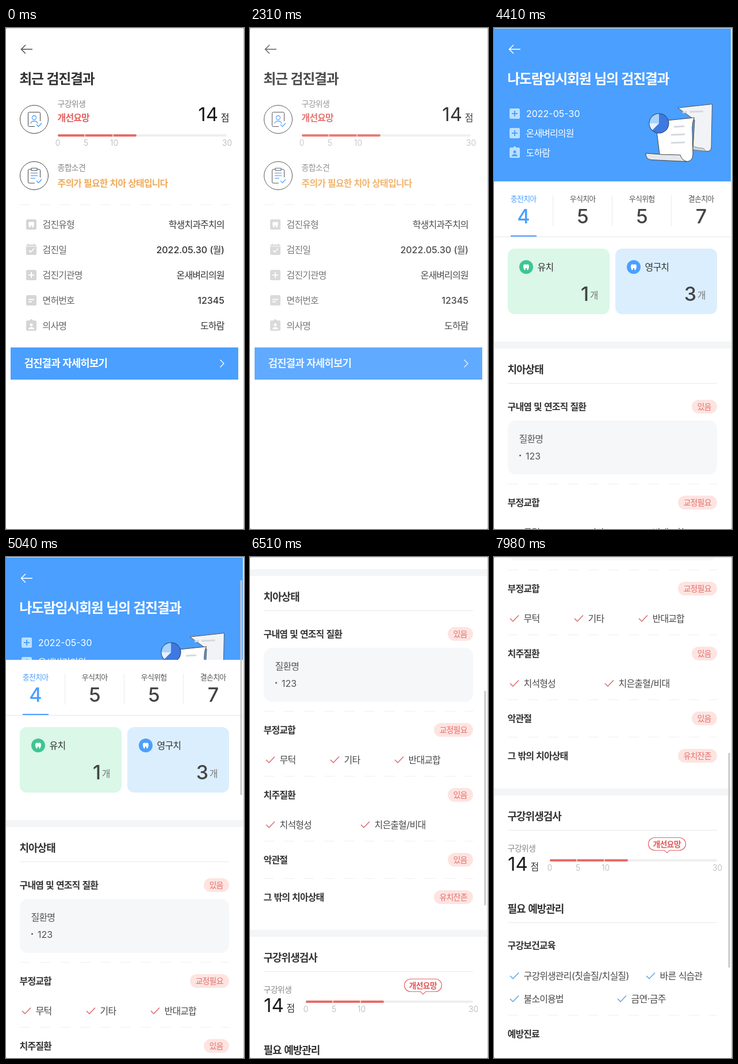
An HTML page with a canvas that plays this animation: 414x872 px, repeating every 8000 ms.

```html
<!DOCTYPE html>
<html lang="ko">
<head>
<meta charset="utf-8">
<title>검진결과</title>
<style>
html, body { margin: 0; width: 100%; height: 100%; overflow: hidden; background: #fff; }
canvas { display: block; width: 414px; height: 872px; }
</style>
</head>
<body>
<canvas id="stage"></canvas>
<script>
const W = 414, H = 872, LOOP = 8000, STEP = 70;
const BLUE = '#4a9fff', RED = '#e96b66', INK = '#333', GRAY = '#888';
const DOCTOR = '도하람', CLINIC = '온새벼리의원', PATIENT = '나도람임시회원';

const canvas = document.getElementById('stage');
const dpr = window.devicePixelRatio || 1;
canvas.width = W * dpr;
canvas.height = H * dpr;
const c = canvas.getContext('2d');

const clamp = v => Math.max(0, Math.min(1, v));
const ramp = (t, from, to) => clamp((t - from) / (to - from));

// ---- drawing helpers ----

// Hangul is set slightly tighter than Latin text and digits.
function text(str, x, cy, size, color, weight = 400, align = 'left') {
  c.font = `${weight} ${size}px Inter, "Noto Sans CJK KR", "Noto Sans CJK", sans-serif`;
  c.fillStyle = color;
  const tight = -0.056 * size;
  const runs = str.match(/[가-힣]+|[^가-힣]+/g).map(s => {
    const hangul = /[가-힣]/.test(s);
    c.letterSpacing = '0px';
    const w = c.measureText(s).width + (hangul ? tight * s.length : 0);
    return { s, hangul, w };
  });
  const total = runs.reduce((sum, r) => sum + r.w, 0);
  if (align === 'right') x -= total;
  if (align === 'center') x -= total / 2;
  for (const r of runs) {
    c.letterSpacing = r.hangul ? tight + 'px' : '0px';
    c.fillText(r.s, x + (r.hangul ? tight / 2 : 0), cy + size * 0.37);
    x += r.w;
  }
  c.letterSpacing = '0px';
}

function rect(x, y, w, h, color) {
  c.fillStyle = color;
  c.fillRect(x, y, w, h);
}

function round(x, y, w, h, r, color) {
  c.fillStyle = color;
  c.beginPath();
  c.roundRect(x, y, w, h, r);
  c.fill();
}

function disc(x, y, r, color) {
  c.fillStyle = color;
  c.beginPath();
  c.arc(x, y, r, 0, Math.PI * 2);
  c.fill();
}

function line(points, color, width = 1) {
  c.strokeStyle = color;
  c.lineWidth = width;
  c.beginPath();
  points.forEach(([x, y], i) => i ? c.lineTo(x, y) : c.moveTo(x, y));
  c.stroke();
}

function shape(d, fill, stroke, width = 1) {
  const p = new Path2D(d);
  if (fill) { c.fillStyle = fill; c.fill(p); }
  if (stroke) { c.strokeStyle = stroke; c.lineWidth = width; c.stroke(p); }
}

function at(x, y, draw) {
  c.save();
  c.translate(x, y);
  draw();
  c.restore();
}

function fade(alpha, draw) {
  if (alpha <= 0) return;
  c.save();
  c.globalAlpha *= alpha;
  draw();
  c.restore();
}

function dashes(y) {
  c.save();
  c.setLineDash([18, 17]);
  line([[24, y + .5], [388, y + .5]], '#eeeeee');
  c.restore();
}

function rule(y) { rect(24, y, 364, 1, '#e9e9e9'); }

function tick(x, y, color) {
  line([[x, y], [x + 5, y + 5], [x + 15, y - 5.5]], color, 1.5);
}

// ---- icons ----

function backArrow(color) {
  line([[46, 37], [27, 37]], color, 1.6);
  line([[34, 29.5], [26.5, 37], [34, 44.5]], color, 1.6);
}

function tooth(color) {
  shape('M0 -4C-2 -5.6 -5 -5 -5 -1.8C-5 1 -3.8 5.5 -2.4 5.5C-1 5.5 -1.4 1.6 0 1.6C1.4 1.6 1 5.5 2.4 5.5C3.8 5.5 5 1 5 -1.8C5 -5 2 -5.6 0 -4Z', color);
}

const glyphs = {
  tooth,
  date(color) { line([[-4, 1], [-1, 4], [5, -2.5]], color, 1.8); },
  plus(color) {
    rect(-5, -1, 10, 2, color);
    rect(-1, -5, 2, 10, color);
  },
  card(color) {
    rect(-5, -2.5, 10, 2, color);
    rect(-5, 1.5, 6, 2, color);
  },
  person(color) {
    disc(0, -1.5, 2.5, color);
    shape('M-5 6.2C-5 1.4 5 1.4 5 6.2Z', color);
  }
};

function boxIcon(kind, x, y, back, front) {
  at(x, y, () => {
    round(-9, -9, 18, 18, 2.5, back);
    if (kind === 'date') {
      rect(-6, -10.5, 2, 3, back);
      rect(4, -10.5, 2, 3, back);
      rect(-9, -6.5, 18, 1, front);
    }
    if (kind === 'person') disc(0, -9, 2.2, back);
    glyphs[kind](front);
  });
}

function ringIcon(y, draw) {
  at(49, y, () => {
    c.strokeStyle = '#444';
    c.lineWidth = 1;
    c.beginPath();
    c.arc(0, 0, 24.5, 0, Math.PI * 2);
    c.stroke();
    draw();
    line([[4, 9], [7.5, 12.5], [13, 6.5]], BLUE, 1.4);
  });
}

function profileIcon() {
  shape('M1 12.5H-8.5Q-10.5 12.5 -10.5 10.5V-10.5Q-10.5 -12.5 -8.5 -12.5H8.5Q10.5 -12.5 10.5 -10.5V3', null, '#444');
  shape('M3.5 -3A3.5 3.5 0 1 1 -3.5 -3A3.5 3.5 0 1 1 3.5 -3M-6 7.5C-6 1.5 6 1.5 6 7.5', null, BLUE, 1.3);
}

function clipIcon() {
  shape('M1 13H-8.5Q-10.5 13 -10.5 11V-9Q-10.5 -11 -8.5 -11H-5M5 -11H8.5Q10.5 -11 10.5 -9V3', null, '#444');
  shape('M-5 -13H5V-9H-5Z', null, '#444');
  for (const [y, w] of [[-4.5, 12], [0, 12], [4.5, 8]])
    line([[-6, y], [-6 + w, y]], BLUE, 1.3);
}

// ---- shared widgets ----

function scale(x, y, end, redEnd, marks) {
  round(x, y - 2, end - x, 4, 2, '#eeeeee');
  round(x, y - 2, redEnd - x, 4, 2, RED);
  for (const m of marks) rect(m - 1.5, y - 2, 1.2, 4, '#fff');
  text('0', x, y + 13, 14, '#b0b0b0', 300, 'center');
  text('5', marks[0] + 1, y + 13, 14, '#b0b0b0', 300, 'center');
  text('10', marks[1] + 1, y + 13, 14, '#b0b0b0', 300, 'center');
  text('30', end + .5, y + 13, 14, '#b0b0b0', 300, 'center');
}

function badge(label, cy) {
  const w = label.length * 12 + 20;
  round(388 - w, cy - 12, w, 24, 12, '#fde4e1');
  text(label, 388 - w / 2, cy, 14, '#e4706c', 500, 'center');
}

function topic(label, cy, tag) {
  text(label, 24, cy, 16, INK, 600);
  if (tag) badge(tag, cy);
}

function section(label, cy) {
  text(label, 24, cy, 18, INK, 600);
  rule(cy + 24);
}

function checks(cy, color, items) {
  for (const [x, label] of items) {
    tick(x, cy, color);
    text(label, x + 24, cy, 16, '#484848');
  }
}

// ---- first page ----

function summary() {
  backArrow('#555');
  text('최근 검진결과', 24, 88, 24, INK, 700);

  ringIcon(159, profileIcon);
  text('구강위생', 90, 132, 14, GRAY);
  text('개선요망', 90, 156, 16, '#e5625f', 700);
  text('14', 369, 150, 33, '#1a1a1a', 400, 'right');
  text('점', 388, 156, 16, '#222', 500, 'right');
  scale(90, 187, 384, 227, [138, 187]);

  ringIcon(257, clipIcon);
  text('종합소견', 90, 243, 14, GRAY);
  text('주의가 필요한 치아 상태입니다', 90, 270, 16, '#f0ab5a', 600);
  dashes(307);

  const rows = [
    ['tooth', '검진유형', '학생치과주치의'],
    ['date', '검진일', '2022.05.30 (월)'],
    ['plus', '검진기관명', CLINIC],
    ['card', '면허번호', '12345'],
    ['person', '의사명', DOCTOR]
  ];
  rows.forEach(([icon, label, value], i) => {
    const y = 342 + i * 44;
    boxIcon(icon, 44, y, '#d5d5d5', '#fff');
    text(label, 64, y, 16, '#666');
    text(value, 380, y, 16, INK, 500, 'right');
  });

  rect(8, 556, 396, 56, BLUE);
  text('검진결과 자세히보기', 32, 583, 18, '#fff', 600);
  line([[372.5, 577.5], [379, 584], [372.5, 590.5]], '#fff', 1.4);
}

// ---- second page ----

function papers() {
  shape('M320 139L379.5 132.5L378 208Q377 215 370 214.5L346 212L349 160Z', '#f1f3f6', '#555');
  shape('M358 209Q366 208 368 214.5L346 212V206Z', '#cfd5de', '#666', .7);
  shape('M281 163L348.5 156Q344 165 345 180L346 219Q346 232 335 232.5L292 227L288 220Z', '#fff', '#444');
  shape('M264 218Q294 221 324 221Q327 231 336 232.5L274 229.5Q264 229 264 218Z', '#e4e8ee', '#444');
  const bars = [[328, 147, 8], [340, 146, 24], [313, 172, 18], [308, 186, 24], [308, 200, 24]];
  for (const [x, y, w] of bars) line([[x, y], [x + w, y - 1]], '#d5d9e0', 3);
  disc(287, 166, 17.5, '#24456f');
  disc(287, 166, 16.5, '#3f78e0');
  shape('M287 166L270.5 166A16.5 16.5 0 0 1 287 149.5Z', '#a9d4fb');
  shape('M287 166L270.5 166A16.5 16.5 0 0 0 275.5 177.7Z', '#e6f2fd');
}

function header() {
  rect(0, 0, 412, 268, BLUE);
  backArrow('#fff');
  text(PATIENT + ' 님의 검진결과', 24, 88, 24, '#fff', 700);
  [['plus', '2022-05-30'], ['plus', CLINIC], ['person', DOCTOR]].forEach(([icon, label], i) => {
    const y = 149 + i * 34;
    boxIcon(icon, 36, y, '#b9e0ff', BLUE);
    text(label, 56, y, 16, '#fff');
  });
  papers();
}

function tabs() {
  [['충전치아', 4], ['우식치아', 5], ['우식위험', 5], ['결손치아', 7]].forEach(([label, n], i) => {
    const x = 51.5 + i * 103;
    text(label, x, 297, 13, i ? '#555' : BLUE, 500, 'center');
    text(String(n), x, 327, 34, i ? '#444' : BLUE, 500, 'center');
    if (i) rect(x - 52.5, 291, 1, 54, '#ebebeb');
  });
  rect(0, 363, 412, 1, '#e6e6e6');
  rect(29, 361, 45, 2, BLUE);
}

function countCard(x, back, color, label, n) {
  round(x, 384, 177, 114, 12, back);
  disc(x + 32, 416, 12, color);
  at(x + 32, 416, () => tooth('#fff'));
  text(label, x + 52, 416, 16, INK, 500);
  text(n, x + 141, 462, 34, '#444', 500, 'right');
  text('개', x + 157, 465, 16, '#777', 400, 'right');
}

function details(cardAlpha) {
  tabs();
  fade(cardAlpha, () => {
    countCard(24, '#daf7e7', '#3ec593', '유치', '1');
    countCard(211, '#daeefe', BLUE, '영구치', '3');
    rect(0, 546, 412, 12, '#f4f5f7');
    round(24, 683, 364, 94, 14, '#f6f7f9');
  });

  section('치아상태', 594);
  topic('구내염 및 연조직 질환', 659, '있음');
  text('질환명', 44, 715, 16, '#555', 500);
  disc(45.5, 744, 1.5, '#555');
  text('123', 55, 745, 16, '#555');
  dashes(793);

  topic('부정교합', 826, '교정필요');
  checks(878, '#d9696c', [[28, '무턱'], [140, '기타'], [252, '반대교합']]);
  dashes(906);
  topic('치주질환', 939, '있음');
  checks(991, '#d9696c', [[28, '치석형성'], [193, '치은출혈/비대']]);
  dashes(1019);
  topic('악관절', 1052, '있음');
  dashes(1084);
  topic('그 밖의 치아상태', 1117, '유치잔존');

  rect(0, 1174, 412, 12, '#f4f5f7');
  section('구강위생검사', 1222);
  text('구강위생', 24, 1278, 14, GRAY);
  text('14', 24, 1305, 33, '#1a1a1a');
  text('점', 64, 1310, 16, '#333');
  scale(97, 1299, 388, 233, [145, 193]);
  shape('M279.5 1259.5H322.5A11 11 0 0 1 322.5 1281.5H305.5L301 1286L296.5 1281.5H279.5A11 11 0 0 1 279.5 1259.5Z', '#fff', '#e4686a', 1.2);
  text('개선요망', 301, 1270.5, 14, '#e0585a', 600, 'center');

  section('필요 예방관리', 1383);
  topic('구강보건교육', 1447.5);
  checks(1500, '#5aa5e8', [[28, '구강위생관리(칫솔질/치실질)'], [265, '바른 식습관']]);
  checks(1540, '#5aa5e8', [[28, '불소이용법'], [215, '금연·금주']]);
  dashes(1568);
  topic('예방진료', 1601);
}

// ---- timeline ----

const scrollKeys = [
  [4480, 0], [4830, 62], [5180, 95], [5460, 95], [5810, 181],
  [6160, 348], [6510, 525], [6790, 675], [7070, 771]
];

// Cubic through the keys, flat at rests.
function scrollAt(t) {
  const k = scrollKeys, last = k.length - 1;
  if (t <= k[0][0]) return k[0][1];
  if (t >= k[last][0]) return k[last][1];
  const i = k.findIndex(p => p[0] > t) - 1;
  const slope = j => {
    if (j === 0 || j === last || k[j][1] === k[j - 1][1] || k[j][1] === k[j + 1][1]) return 0;
    return (k[j + 1][1] - k[j - 1][1]) / (k[j + 1][0] - k[j - 1][0]);
  };
  const [t0, a] = k[i], [t1, b] = k[i + 1], d = t1 - t0, u = (t - t0) / d;
  const v = (1 - u) * (1 - u), w = u * u;
  return Math.round(v * (1 + 2 * u) * a + v * u * d * slope(i)
    + w * (3 - 2 * u) * b - w * (1 - u) * d * slope(i + 1));
}

function result(t) {
  const scroll = scrollAt(t);
  const slide = 30 * (1 - ramp(t, 2590, 3360)) ** 2;
  fade(ramp(t, 3080, 3430), header);
  at(slide, -scroll, () => {
    rect(-slide, 267, W, 1706, '#fff');
    fade(ramp(t, 2590, 3150), () => details(ramp(t, 2800, 3430)));
  });
  const bar = t < 4500 ? ramp(t, 2590, 2800) * (1 - ramp(t, 3780, 4200)) : 1;
  fade(bar, () => round(407.5, 1.5 + scroll * .44, 3, 374, 1.5, '#c8c8c8'));
}

function edge() {
  rect(0, 0, W, 1, '#d6d6d6');
  rect(412, 0, 1, H, '#ececec');
  rect(413, 0, 1, H, '#d2d2d2');
  for (const [x, y] of [[0, 0], [413, 0], [0, 871], [413, 871]]) rect(x, y, 1, 1, '#777');
}

function frame(now) {
  const t = Math.floor((now % LOOP) / STEP) * STEP;
  c.setTransform(dpr, 0, 0, dpr, 0, 0);
  rect(0, 0, W, H, '#fff');
  if (t < 2590) fade(t < 2310 ? 1 : .88 * (1 - ramp(t, 2310, 2520)), summary);
  else result(t);
  edge();
  requestAnimationFrame(frame);
}
requestAnimationFrame(frame);
</script>
</body>
</html>
```
